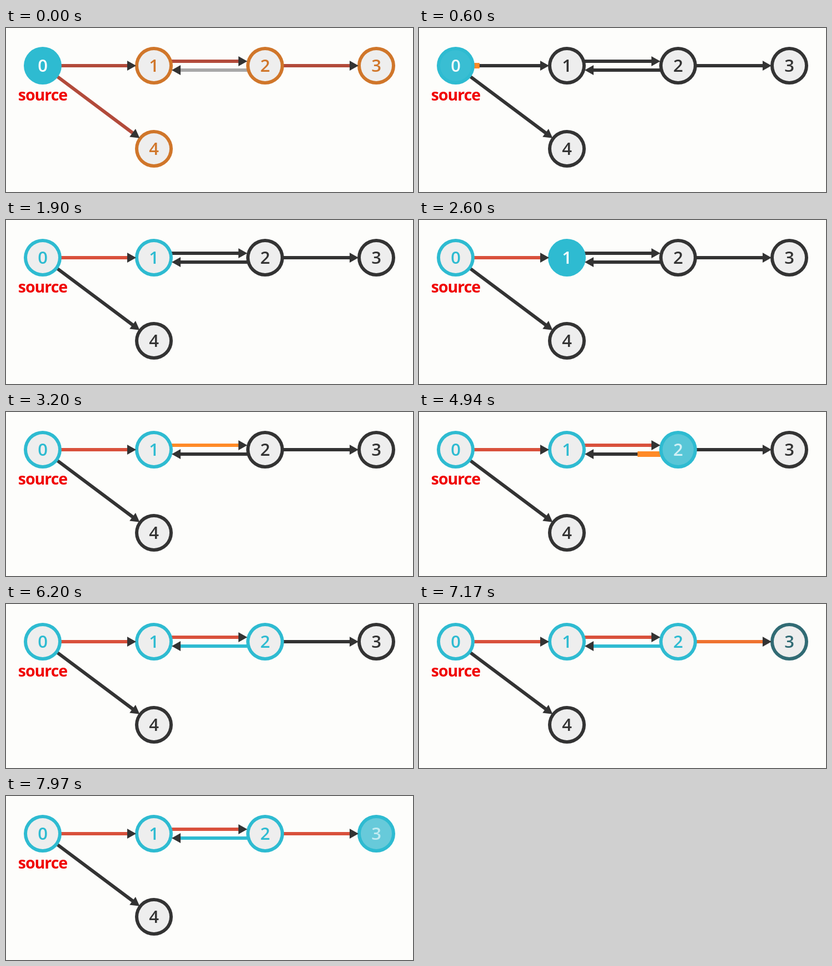
Recreate the animation shown at these times as an HTML page. Size 732 by 296 pixels, loop 8000 ms.

```html
<!DOCTYPE html>
<html lang="en">
<head>
<meta charset="utf-8">
<title>Depth-first search</title>
<style>
  html, body { margin: 0; width: 100%; height: 100%; overflow: hidden; background: #fdfdfb; }
  svg { display: block; width: 732px; height: 296px; }
  text { font: 600 31px "Open Sans", "Noto Sans", sans-serif; text-anchor: middle; }
  .label { font-size: 28.5px; font-weight: 700; letter-spacing: -1px; fill: #f00000; }
</style>
</head>
<body>
<svg viewBox="0 0 732 296">
  <g id="edges"></g>
  <g id="nodes"></g>
  <g id="arrows" fill="#333"></g>
  <text class="label" x="66" y="131">source</text>
</svg>
<script>
const LOOP = 8000, FADE = 700, GROW = 630;
const STEPS = [-270, 430, 1138, 1845, 2553, 3260, 3968, 4675, 5398, 6120, 6843, 7565];

const dark = [51, 51, 51], pale = [238, 238, 238], teal = [46, 187, 209], white = [255, 255, 255];
const orange = [255, 138, 39], red = [217, 81, 60], gray = [204, 204, 204];

// Node styles: ring, fill, digit
const old = [orange, pale, orange], plain = [dark, pale, dark];
const seen = [teal, pale, teal], active = [teal, teal, white];

// Tracks: initial style, then [step, next style]
const nodes = [
  { x: 66, y: 68, start: active, track: [[1, seen]] },
  { x: 266, y: 68, start: old, track: [[0, plain], [2, seen], [3, active], [4, seen]] },
  { x: 466, y: 68, start: old, track: [[0, plain], [5, seen], [6, active], [7, seen]] },
  { x: 666, y: 68, start: old, track: [[0, plain], [10, seen], [11, active]] },
  { x: 266, y: 218, start: old, track: [[0, plain]] }
];

// "grow" is the step at which the highlight runs along the edge
const edges = [
  { from: 0, to: 1, dy: 0, start: red, grow: 1, track: [[0, dark], [2, red]] },
  { from: 1, to: 2, dy: -8, start: red, grow: 4, track: [[0, dark], [5, red]] },
  { from: 2, to: 1, dy: 8, start: gray, grow: 7, track: [[0, dark], [8, teal]] },
  { from: 2, to: 3, dy: 0, start: red, grow: 9, track: [[0, dark], [10, red]] },
  { from: 0, to: 4, dy: 0, start: red, track: [[0, dark]] }
];

const progress = (t, step, duration) => Math.min(1, Math.max(0, (t - STEPS[step]) / duration));
const ease = p => p < 0.5 ? 4 * p ** 3 : 1 - 4 * (1 - p) ** 3;
const fade = (t, step) => ease(progress(t, step, FADE));
const mix = (a, b, k) => a.map((v, i) => v + (b[i] - v) * k);
const css = c => `rgb(${c.map(Math.round).join()})`;

function add(parent, tag, attrs) {
  const el = document.createElementNS("http://www.w3.org/2000/svg", tag);
  for (const name in attrs) el.setAttribute(name, attrs[name]);
  return document.getElementById(parent).appendChild(el);
}

for (const e of edges) {
  const a = nodes[e.from], b = nodes[e.to];
  const dx = b.x - a.x, dy = b.y - a.y, dist = Math.hypot(dx, dy);
  const place = `translate(${a.x} ${a.y + e.dy}) rotate(${Math.atan2(dy, dx) * 180 / Math.PI})`;
  e.end = dist - 32;
  e.line = add("edges", "line", { transform: place, x1: 32, x2: e.end - 8, "stroke-width": 6 });
  if (e.grow) {
    e.glow = add("edges", "line", { transform: place, x1: 32, "stroke-width": 10, stroke: css(orange) });
  }
  add("arrows", "path", { transform: place, d: `M${e.end} 0l-16 -9v18z` });
}

nodes.forEach((n, i) => {
  n.ring = add("nodes", "circle", { cx: n.x, cy: n.y, r: 34 });
  n.disc = add("nodes", "circle", { cx: n.x, cy: n.y, r: 28 });
  n.digit = add("nodes", "text", { x: n.x, y: n.y + 11 });
  n.digit.textContent = i;
});

function drawNode(n, t) {
  let look = n.start;
  for (const [step, next] of n.track) {
    const k = fade(t, step);
    look = look.map((c, i) => mix(c, next[i], k));
  }
  [n.ring, n.disc, n.digit].forEach((el, i) => el.setAttribute("fill", css(look[i])));
}

function drawEdge(e, t) {
  const p = e.grow ? progress(t, e.grow, GROW) : 0;
  let color = e.start;
  for (const [step, next] of e.track) {
    if (step > e.grow && p === 1) color = orange;
    color = mix(color, next, fade(t, step));
  }
  e.line.setAttribute("stroke", css(color));
  if (e.glow) {
    e.glow.setAttribute("x2", 32 + (e.end - 32) * ease(p));
    e.glow.setAttribute("visibility", p > 0 && p < 1 ? "visible" : "hidden");
  }
}

const begin = performance.now();
function frame() {
  const t = (performance.now() - begin) % LOOP;
  nodes.forEach(n => drawNode(n, t));
  edges.forEach(e => drawEdge(e, t));
  requestAnimationFrame(frame);
}
frame();
</script>
</body>
</html>
```
